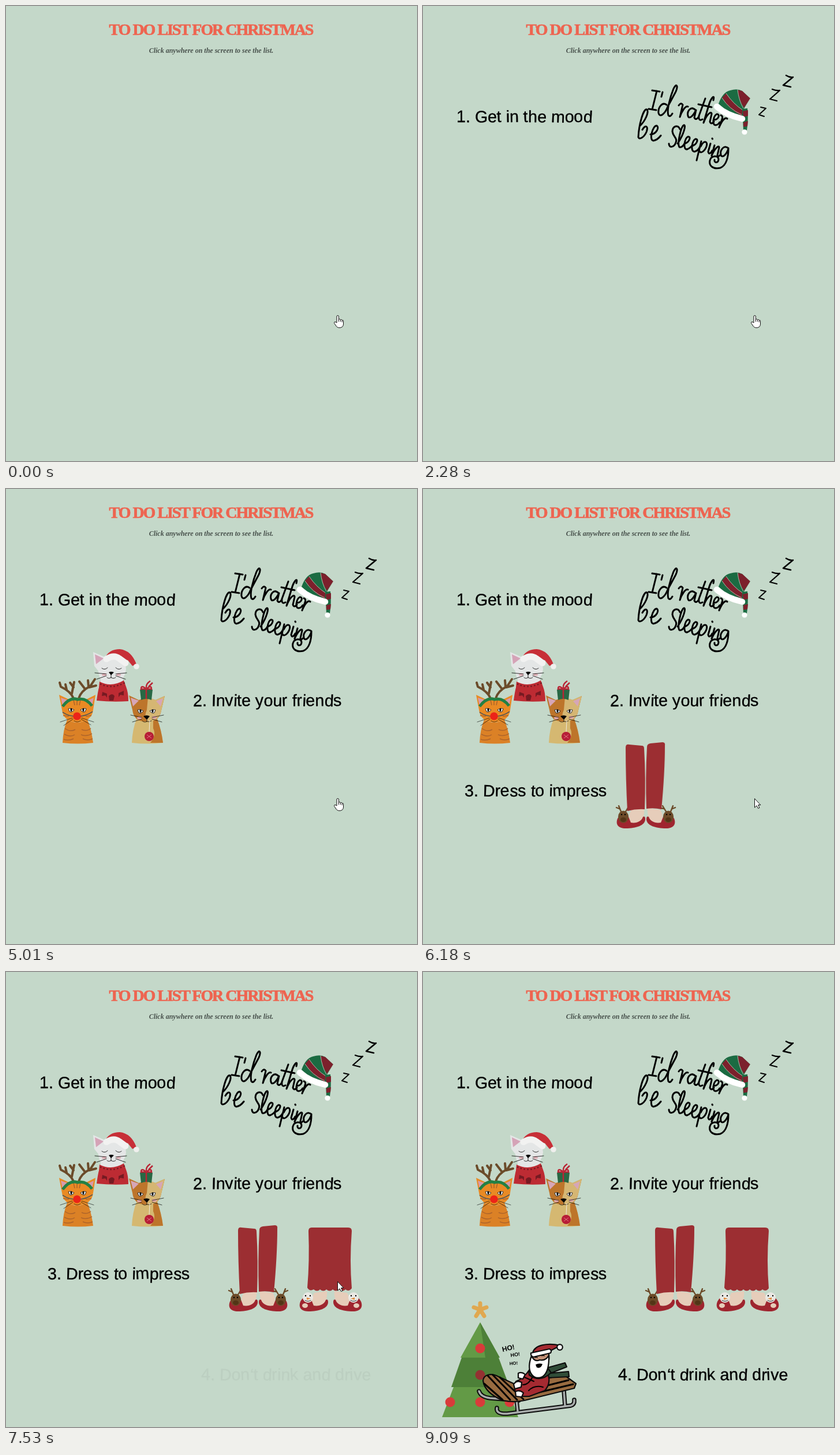
An HTML page that plays this animation: 712x787 px, repeating every 9930 ms.

```html
<!DOCTYPE html>
<html lang="en">
<head>
<meta charset="utf-8">
<title>To do list</title>
<style>
html, body { margin: 0; width: 100%; height: 100%; overflow: hidden; background: #c4d8c9; }
svg { display: block; width: 712px; height: 787px; }
.title { font: bold 28px "Liberation Serif", serif; letter-spacing: -2.05px; fill: #ee6450; stroke: #ee6450; stroke-width: .7; }
.hint { font: italic bold 12px "Liberation Serif", serif; fill: #47504b; }
.item { font: 28.6px "Liberation Sans", sans-serif; stroke: #000; stroke-width: .35; }
.ho { font: bold 12px "Liberation Sans", sans-serif; }
.ink { fill: none; stroke: #000; stroke-linecap: round; stroke-linejoin: round; }
.fine { stroke-width: .8; }
.cartoon { stroke: #0c0c0c; stroke-width: 2.2; stroke-linejoin: round; }
#sleep { transform-origin: 469px 209px; }
</style>
</head>
<body>
<svg viewBox="0 0 712 787">
<defs>
  <g id="foot">
    <path fill="#e6cdba" d="M412 555L434 552Q436 572 421 578L410 577Q405 566 412 555Z"/>
    <path fill="#9f252f" d="M388 570C384 580 389 587 402 587C420 587 436 582 436 571Q436 565 432 567C430 574 421 579 411 577L405 562Q394 558 388 570Z"/>
  </g>
  <g id="deerFoot">
    <use href="#foot"/>
    <path fill="none" stroke="#6b4a28" stroke-width="2.4" stroke-linecap="round" d="M394 558L390 548M391 553L386 551M402 558L408 548M405 553L411 552"/>
    <ellipse cx="398" cy="567" rx="9" ry="10.5" fill="#6b4a28"/>
    <circle cx="395" cy="563" r="1.2"/><circle cx="401" cy="563" r="1.2"/>
    <ellipse cx="398" cy="572" rx="5" ry="4" fill="#533517"/>
  </g>
  <g id="snowFoot">
    <use href="#foot" x="122"/>
    <ellipse cx="518" cy="577" rx="5" ry="4" fill="#e6cdba"/>
    <circle cx="523" cy="563" r="9" fill="#e9e8e3"/>
    <circle cx="519" cy="560" r="1.2"/><circle cx="527" cy="560" r="1.2"/>
    <path fill="#e28a3a" d="M521 563L528 565L521 567Z"/>
    <path class="ink fine" d="M518 568Q523 571 528 568"/>
  </g>
  <g id="eye">
    <path fill="#fff" stroke="#1a1a1a" stroke-width=".9" d="M-5 -2Q0 -4 5 0Q1 5 -3 3Z"/>
    <ellipse rx="1.6" ry="2.8"/>
  </g>
</defs>

<text class="title" x="355" y="50" text-anchor="middle">TO DO LIST FOR CHRISTMAS</text>
<text class="hint" x="355.5" y="81" text-anchor="middle">Click anywhere on the screen to see the list.</text>

<text class="item" id="item1" x="58" y="201">1. Get in the mood</text>
<text class="item" id="item2" x="324" y="375.5">2. Invite your friends</text>
<text class="item" id="item3" x="72" y="531.5">3. Dress to impress</text>
<text class="item" id="item4" x="338" y="706">4. Don‘t drink and drive</text>

<g id="sleep">
  <path class="ink" stroke-width="3" d="M397 146L410 148M405 147L397 179M391 178L404 180M415 149L413 157
    M422 171C414 165 407 176 408 185C410 194 419 187 424 174L438 148C443 136 438 134 434 143C428 158 422 180 425 189Q428 193 432 186
    M443 172Q447 166 450 171L445 192C448 182 455 172 459 174
    M472 180C464 172 457 182 459 190C461 197 468 190 473 180L470 193Q473 199 478 191
    M489 160L478 190Q477 200 484 196M477 170L500 175
    M503 163C506 152 499 158 495 172L486 202C492 186 500 181 500 187L497 200Q499 206 504 200
    M504 197C514 196 514 186 509 187C503 190 500 206 507 206Q511 206 514 201
    M516 189Q520 190 518 196L513 210C517 200 523 191 527 195
    M376 207C384 200 392 184 388 179C382 176 374 205 373 227C375 232 383 227 387 218C391 207 385 205 380 214
    M394 222C404 222 410 210 405 207C398 206 391 232 399 233Q406 232 412 224
    M445 213C442 204 432 208 432 217C433 226 441 228 438 236C435 245 426 246 426 238
    M441 238C452 222 456 205 452 206C447 208 440 238 444 244Q449 246 454 236
    M454 238C463 234 464 225 459 226C453 229 450 248 457 248Q463 246 467 240
    M467 242C476 238 477 229 472 230C466 233 463 251 470 252Q476 251 480 243
    M482 234L474 267M481 243C487 231 494 234 491 243C488 251 481 256 479 251
    M498 238L494 252Q496 259 501 250M501 229l.5 1
    M505 241L500 259C505 247 513 239 513 245L510 258Q511 263 516 256
    M529 246C521 239 514 250 516 258C519 264 526 256 529 247C529 260 526 276 515 280C502 283 495 276 497 267C499 259 511 257 512 265C512 272 504 272 505 266"/>
  <path fill="#1b6b42" d="M512 169Q519 149 532 146Q545 142 553 147L567 160L556 178L553 193Q528 186 512 169Z"/>
  <path fill="#7c202c" d="M518 159L525 151Q538 170 554 180L552 190Q530 178 518 159ZM545 145L553 147L567 160L556 176Q547 163 545 145Z"/>
  <path fill="none" stroke="#c9d3c4" stroke-width=".8" d="M518 159Q530 178 552 188M525 151Q538 170 554 180M545 145Q547 163 555 177M556 178L567 160"/>
  <path fill="#1b6b42" d="M553 178L562 177Q564 196 561 215H555Z"/>
  <path fill="#7c202c" d="M554 182L563 180V190L555 192ZM555 201L563 199L562 208L555 209Z"/>
  <path fill="none" stroke="#fff" stroke-width="10.5" stroke-linecap="round" d="M509 174Q526 189 553 195"/>
  <circle cx="557" cy="218" r="4.6" fill="#fff"/>
</g>
<path class="ink" id="z1" stroke-width="1.9" d="M585 175L594 177L582 188L591 191"/>
<path class="ink" id="z2" stroke-width="2.3" d="M605 144Q612 147 618 146L601 161L613 164"/>
<path class="ink" id="z3" stroke-width="2.6" d="M629 120Q635 124 641 123L624 137L637 140"/>

<g id="cats">
  <path fill="#e4e6e6" d="M151 282L153 306L160 315Q162 338 181 338Q204 338 208 312L205 290L172 291Z"/>
  <path fill="#d5a3b7" d="M154 286L156 303L169 293Z"/>
  <path fill="#e4e6e6" d="M165 328H202L207 345H160Z"/>
  <path fill="#bd2b33" d="M162 333Q182 344 204 331L208 342Q212 352 212 367Q185 369 157 366Q159 351 161 343Z"/>
  <path fill="none" stroke="#761a22" stroke-width="2.5" stroke-dasharray="2.5 3.5" d="M163 337Q183 347 206 335"/>
  <path fill="#761a22" d="M167 351l8 3 0 7-3-4-6 1ZM204 349l-9 4 0 7 3-4 6 1ZM178 358q6-6 10 0l-2 8h-7Z"/>
  <path fill="#c72f37" d="M171 292Q179 277 197 277Q217 279 226 303L219 306L211 296Z"/>
  <path fill="none" stroke="#f2f2f1" stroke-width="11" stroke-linecap="round" stroke-linejoin="round" d="M174 294Q187 286 196 293L207 301"/>
  <circle cx="226" cy="307" r="4.8" fill="#efefed"/>
  <g fill="#e0b4ba"><ellipse cx="170" cy="321" rx="4" ry="2.6"/><ellipse cx="195" cy="321" rx="4" ry="2.6"/></g>
  <path class="ink fine" d="M166 310Q171 314 176 309M190 309Q195 314 200 310M182 320V326M182 326Q178 329 175 326M182 326Q186 329 190 326M174 320L154 318M174 323L157 329M190 320L209 318M190 323L207 329"/>
  <path d="M178 317Q182 315 187 317L182 322Z"/>

  <path fill="none" stroke="#6b4b2a" stroke-width="4" stroke-linecap="round" stroke-linejoin="round" d="M117 362Q112 350 95 342L93 335M105 347L103 338M114 354L118 334M117 343L111 335M126 362Q130 349 146 341L154 329M137 346L127 333M143 342L142 331M144 343L156 340"/>
  <path fill="#e98a24" d="M92 356L97 382Q99 402 123 404Q149 402 151 382L155 356L139 364Q123 358 109 364Z"/>
  <path fill="#d79aac" d="M95 361L98 375L107 365ZM152 361L149 375L141 366Z"/>
  <path fill="#db8126" d="M106 399Q123 409 141 399Q148 416 151 439Q124 442 98 439Q99 416 106 399Z"/>
  <path fill="none" stroke="#ad642b" stroke-width="1.5" d="M102 414Q111 421 120 416M101 424Q112 430 119 425M100 433Q108 436 117 432M147 414Q140 420 131 416M149 423Q140 429 130 425M150 432Q142 436 133 432M123 362V374M117 365L119 374M129 365L127 374M99 392L109 393M148 392L138 393"/>
  <path fill="none" stroke="#248044" stroke-width="5" d="M98 376Q111 359 124 364Q138 360 149 375"/>
  <use href="#eye" x="113" y="382"/><use href="#eye" transform="translate(134 382)scale(-1 1)"/>
  <path fill="none" stroke="#344c61" stroke-width="1.4" d="M98 386Q110 394 123 393Q137 394 150 385"/>
  <path class="ink" stroke-width=".6" d="M115 396L94 403M116 398L100 409M131 396L152 403M130 398L147 408M118 401Q123 405 129 401"/>
  <circle cx="123" cy="393" r="6.8" fill="#ec2418"/>

  <path fill="#bd752b" d="M213 357L219 382Q221 401 242 405Q266 403 269 383L275 358L259 365Q244 358 230 365Z"/>
  <path fill="#d5b673" d="M246 360L259 365L275 358L269 383Q266 400 246 404Q238 394 244 382Z"/>
  <path fill="#d6a6b7" d="M216 361L220 376L230 366ZM272 362L268 376L260 367Z"/>
  <path fill="#d5b871" d="M226 398Q243 407 262 398Q269 416 272 439Q245 442 218 439Q219 416 226 398Z"/>
  <path fill="#bd752b" d="M255 401L262 398Q269 416 272 439H250Q261 426 255 414Z"/>
  <use href="#eye" x="233" y="384"/><use href="#eye" transform="translate(254 384)scale(-1 1)"/>
  <g fill="#dca3a1"><ellipse cx="231" cy="396" rx="4" ry="2.6"/><ellipse cx="257" cy="395" rx="4" ry="2.6"/></g>
  <path d="M238 393Q244 390 249 393L244 399Z"/>
  <path class="ink" stroke-width=".7" d="M244 398V402M244 402Q240 405 236 401M244 402Q248 404 252 401M235 395L216 391M235 398L219 403M253 395L273 391M253 398L270 403"/>
  <path fill="#286844" d="M232 347H254L252 365Q243 361 234 365Z"/>
  <path fill="none" stroke="#b92535" stroke-width="2.5" d="M243 347V363M243 346Q234 338 234 346ZM243 346Q252 338 252 346ZM243 344Q242 337 250 332M247 342L254 335"/>
  <path fill="none" stroke="#eee9df" d="M249 400L248 421"/>
  <circle cx="248" cy="428" r="8" fill="#b71d36"/>
  <path fill="none" stroke="#df7381" d="M244 425l8 6m0-6l-8 6"/>
</g>

<g id="trousers">
  <use href="#deerFoot"/><use href="#deerFoot" transform="translate(874 0)scale(-1 1)"/>
  <path fill="#9c2e32" d="M402 447Q402 441 408 442L430 444Q434 444 434 449Q437 500 435 554Q420 553 405 557Q402 500 402 447ZM439 446Q439 441 445 440L466 438Q471 438 470 444Q470 490 464 554Q451 551 438 553Q436 500 439 446Z"/>
</g>
<g id="skirt">
  <use href="#snowFoot"/><use href="#snowFoot" transform="translate(1125 0)scale(-1 1)"/>
  <path fill="#9c2e32" d="M524 448Q524 441 531 442H593Q599 442 599 448Q595 500 599 547q-5 7-11 2q-5 5-11 0q-5 5-11 0q-5 5-11 0q-5 5-11 0q-5 5-11 0q-7 4-11-3Q526 500 524 448Z"/>
</g>

<g id="tree">
  <path fill="none" stroke="#e0a850" stroke-width="7" stroke-linecap="round" d="M99 584V573M99 584L110 580M99 584L106 595M99 584L92 595M99 584L88 580"/>
  <path fill="#639a46" d="M53 718L33 770H165L146 718Z"/>
  <path fill="#4d8038" d="M67 667L49 718H150L131 667Z"/>
  <path fill="#639a46" d="M99 606L65 667H133Z"/>
  <path fill="#4d8038" d="M99 606L133 667H108Z"/>
  <circle cx="99" cy="697" r="8.5" fill="#943132"/>
  <g fill="#d93b3a"><circle cx="99" cy="651" r="8.5"/><circle cx="47" cy="744" r="8.5"/><circle cx="99" cy="744" r="8.5"/><circle cx="150" cy="744" r="8.5"/></g>
</g>

<g id="sleigh">
  <g class="ho">
    <text transform="translate(138 657)rotate(-13)">HO!</text>
    <text transform="translate(152 666)rotate(-8)scale(.75)">HO!</text>
    <text transform="translate(150 680)rotate(-4)scale(.65)">HO!</text>
  </g>
  <g id="runners" fill="none" stroke-linecap="round">
    <path d="M97 725Q100 735 116 737L166 741M128 754Q126 765 146 764L256 750Q263 748 262 740M162 740L164 760M244 724L246 750"/>
  </g>
  <path class="cartoon" fill="#986b40" d="M104 707C105 696 118 693 131 700L166 716L243 696L265 712L262 720L184 739Q160 746 138 741Q107 728 104 707Z"/>
  <path class="ink" stroke="#3b2615" stroke-width="3" d="M112 698L151 740M121 697L163 740M133 701L174 739M106 712L138 740M176 725L252 706M180 732L260 713"/>
  <path class="cartoon" fill="#304d38" d="M210 686L246 676L249 683L221 694L252 691L253 700L214 702Z"/>
  <path class="cartoon" fill="#a52a31" d="M185 687Q174 704 161 708Q155 726 166 734L184 734L211 724Q224 709 214 690Z"/>
  <path class="cartoon" fill="#fff" d="M157 713Q163 705 171 710L170 718L159 721ZM160 726Q167 722 174 728L171 735L161 734ZM165 694Q171 691 177 696L173 704L165 702Z"/>
  <path class="ink" stroke-width="2" d="M190 700Q183 714 173 714M183 724Q193 714 208 718M176 701L192 708"/>
  <path class="cartoon" fill="#304d38" d="M183 690Q198 703 215 684L222 693Q203 711 184 697Z"/>
  <path class="cartoon" fill="#c49278" d="M189 661L217 656Q221 673 213 681H190Z"/>
  <path class="cartoon" fill="#fff" d="M188 664Q181 683 187 694Q194 706 207 700Q219 692 218 663Q213 673 202 671Q193 675 188 664Z"/>
  <path d="M195 679Q201 676 207 678Q204 687 197 684Z"/>
  <path class="ink" stroke-width="1.4" d="M194 667q2-2 4 0M206 664q2-2 4 0"/>
  <path class="cartoon" fill="#a52a31" d="M190 659C193 645 215 641 238 646L221 655Z"/>
  <path class="cartoon" fill="#fff" d="M187 659L219 652Q224 654 221 659L191 666Q186 664 187 659Z"/>
  <circle class="cartoon" cx="237" cy="649" r="4.8" fill="#fff"/>
</g>

<g id="pointer" fill="#fff" stroke="#111" stroke-linejoin="round">
  <path id="arrow" d="M574.5 535.5V551L578 547.7L580.6 552.5L583 551.3L580.5 546.5H584.8Z"/>
  <path id="hand" d="M573 537a1.7 1.7 0 0 1 3.4 0V542q2.5-1.5 3 .7q2.5-1.2 2.8.8q2.2-.8 2.3 1.5V550q0 6-6.5 6.5q-5 0-7-4.5l-2.5-3.5q0-3 2.5-2l2 1.5ZM576.4 542V546M579.4 543V546M582.2 544V547"/>
</g>
</svg>

<script>
const LOOP = 9930;
const byId = id => document.getElementById(id);
const play = (id, frames) => byId(id).animate(
  frames.map(([time, style]) => ({ ...style, offset: time / LOOP })),
  { duration: LOOP, iterations: Infinity });

// Hidden until start, then moves from one style to the resting one and stays.
function enter(id, start, end, { opacity = 0, from = "none", easing = "linear" } = {}) {
  const rest = { opacity: 1, transform: "none" };
  const first = { opacity, transform: from };
  play(id, [
    [0, { ...first, opacity: 0 }], [start, { ...first, opacity: 0 }],
    [start, { ...first, easing }], [end, rest], [LOOP, rest]
  ]);
}

function toggle(id, visible, times) {
  const frames = [[0, { opacity: +visible }]];
  for (const time of times) {
    frames.push([time, { opacity: +visible }]);
    visible = !visible;
    frames.push([time, { opacity: +visible }]);
  }
  play(id, [...frames, [LOOP, { opacity: +visible }]]);
}

// Uneven letters, as if written by hand.
for (const line of document.querySelectorAll(".item")) {
  const turns = [...line.textContent].map((_, i) => (3 * Math.sin(i * 2.3)).toFixed(1));
  line.setAttribute("rotate", turns.join(" "));
}

// Metal runners: a dark outline under a lighter core.
const outline = byId("runners").firstElementChild;
const core = outline.cloneNode();
outline.setAttribute("style", "stroke:#0c0c0c;stroke-width:7.5");
core.setAttribute("style", "stroke:#a9adac;stroke-width:3.5");
byId("runners").append(core);

enter("item1", 530, 750);
enter("sleep", 920, 1530, { from: "scale(.1)" });
enter("z1", 1530, 1730);
enter("z2", 1730, 1940);
enter("z3", 1940, 2270);
enter("item2", 3500, 3720);
enter("cats", 4405, 5010, { opacity: .2, from: "translateX(-30px)" });
enter("item3", 5690, 5880);
enter("skirt", 6360, 6840, { from: "translateX(19px)", easing: "ease-out" });
enter("item4", 7522, 7740);
enter("tree", 7750, 7950, { from: "translateY(8px)" });
enter("sleigh", 8270, 8490);

const shift = x => `translateX(${x}px)`;
play("trousers", [
  [0, { opacity: 0, transform: shift(-53) }],
  [6080, { opacity: 0, transform: shift(-53) }],
  [6170, { opacity: 1, transform: shift(-51), easing: "ease-in-out" }],
  [6840, { opacity: 1, transform: shift(0) }],
  [LOOP, { opacity: 1, transform: shift(0) }]
]);

const clicks = [540, 1980, 3510, 4990, 5700, 6830, 7530];
toggle("hand", true, clicks);
toggle("arrow", false, [...clicks, 9080]);
const at = (x, y) => ({ transform: `translate(${x}px, ${y}px)` });
play("pointer", [
  [0, at(0, 0)], [8270, at(0, 0)], [8490, at(100, 217)], [8840, at(100, 217)],
  [8930, at(112, 182)], [9080, at(128, 254)], [LOOP, at(128, 254)]
]);
</script>
</body>
</html>
```
